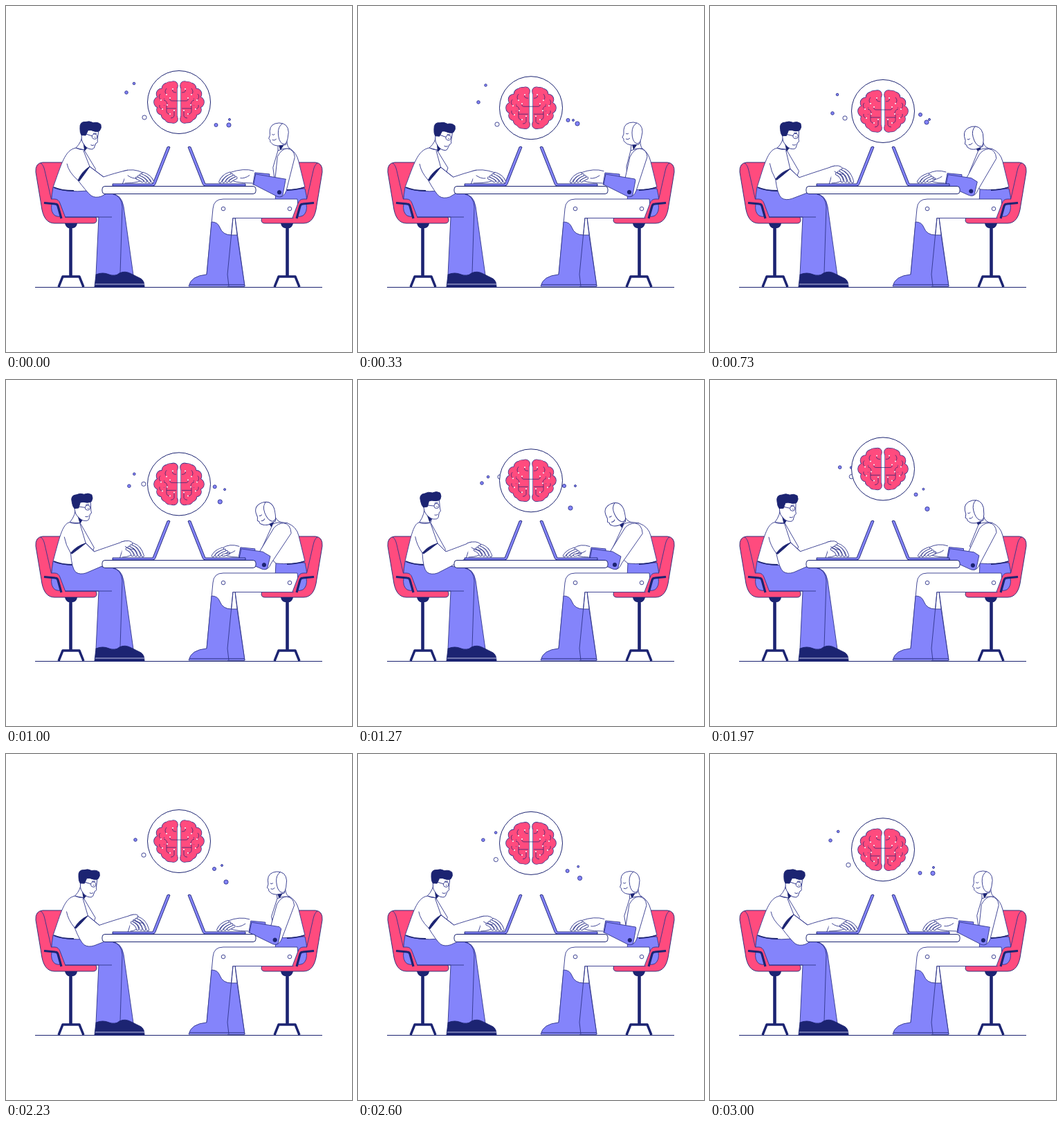
Write an HTML page with a canvas that moves like this. It is 500 px wide and 500 px high and loops after 3030 ms.

```html
<!DOCTYPE html>
<html lang="en">
<head>
<meta charset="utf-8">
<title>Brainstorm</title>
<style>
  html, body { margin: 0; width: 100%; height: 100%; overflow: hidden; background: #fff; }
  canvas { display: block; width: 500px; height: 500px; }
</style>
</head>
<body>
<canvas id="stage" width="500" height="500"></canvas>
<script>
const ctx = document.getElementById('stage').getContext('2d');
const LOOP = 3030;
const TIMES = [0, 330, 730, 1270, 1670, 2230];
const PINK = '#ff4b7e', LILAC = '#8484fb', NAVY = '#1c2472', LINE = '#30368c', WHITE = '#fff';

// Smooth periodic curve through one value per key time, without overshoot.
function track(v) {
  const n = v.length;
  const at = i => v[(i + n) % n];
  const span = i => ((TIMES[(i + 1) % n] - TIMES[(i + n) % n]) + LOOP) % LOOP;
  const rise = i => (at(i + 1) - at(i)) / span((i + n) % n);
  const slope = v.map((_, i) => {
    const a = rise(i - 1), b = rise(i);
    return a * b > 0 ? 2 * a * b / (a + b) : 0;
  });
  return t => {
    let i = n - 1;
    while (TIMES[i] > t) i--;
    const h = span(i), s = (t - TIMES[i]) / h, s2 = s * s, s3 = s2 * s;
    return (2 * s3 - 3 * s2 + 1) * at(i) + (s3 - 2 * s2 + s) * h * slope[i] +
      (3 * s2 - 2 * s3) * at(i + 1) + (s3 - s2) * h * slope[(i + 1) % n];
  };
}

const man = {
  x: track([121.5, 124.5, 116, 104.5, 102, 119.5]),
  y: track([176, 177.5, 176, 171, 171, 176]),
  tilt: track([12, 14, 7, 0, 0, 11]),
  lean: track([.13, 0, .38, .9, 1, .22]),
  arm: track([0, .24, .85, 1, 1, .44]),
  wrist: track([176, 171, 180, 164, 163, 184]),
  tip: track([213, 213, 207, 193, 194, 206]),
  lift: track([237, 237, 231, 234, 234, 232])
};
const bot = {
  lean: track([.1, 0, .6, .97, 1, .2]),
  arm: track([-.14, 0, .7, 1, 1, .16])
};

const dot = (r, fill, xs, ys) => ({ r, fill, x: track(xs), y: track(ys) });
const dots = [
  dot(1.8, LILAC, [185, 184.5, 184, 188, 194, 210], [112, 114.5, 128, 140, 138, 117]),
  dot(2.3, LILAC, [174, 174, 177, 179, 188, 187], [125, 139, 155, 149, 132, 124]),
  dot(3.1, WHITE, [200, 201, 195, 205, 211, 199], [161, 171, 162, 140, 135, 146]),
  dot(2.5, LILAC, [303.5, 303.5, 304, 298, 294, 301], [172, 165, 157, 153, 165, 166]),
  dot(3.1, LILAC, [322, 317, 313, 307, 309, 318], [172, 170, 168, 185, 187, 185]),
  dot(1.5, LILAC, [323, 311, 317, 314, 306, 312], [164, 165, 164, 153, 154, 161])
];

const mix = (a, b, u) => a + (b - a) * u;
const mixPt = (a, b, u) => [mix(a[0], b[0], u), mix(a[1], b[1], u)];
const off = (p, x, y) => [p[0] + x, p[1] + y];

function shape(d, fill, line = LINE, width = .9) {
  const p = new Path2D(d);
  if (fill) { ctx.fillStyle = fill; ctx.fill(p); }
  if (line) { ctx.strokeStyle = line; ctx.lineWidth = width; ctx.stroke(p); }
}
function disc(x, y, r, fill, line = LINE, width = .9) {
  ctx.beginPath();
  ctx.arc(x, y, r, 0, 7);
  if (fill) { ctx.fillStyle = fill; ctx.fill(); }
  if (line) { ctx.strokeStyle = line; ctx.lineWidth = width; ctx.stroke(); }
}
function mirrored(draw) {
  ctx.save();
  ctx.translate(500, 0);
  ctx.scale(-1, 1);
  draw();
  ctx.restore();
}
function placed(x, y, deg, draw) {
  ctx.save();
  ctx.translate(x, y);
  ctx.rotate(deg * Math.PI / 180);
  draw();
  ctx.restore();
}
function spin(x, y, deg, px, py) {
  const a = deg * Math.PI / 180, c = Math.cos(a), s = Math.sin(a);
  return [x + px * c - py * s, y + px * s + py * c];
}

function chair() {
  shape('M85 226L53 226Q42 227 43 240L51 288Q54 314 70 314L126 314Q131 314 131 309L130 305L80 305Z', PINK, NAVY);
  shape('M50 227Q54 229 56 238L67 286', null);
  shape('M85 314L103 314Q102 320 97 321L90 321Q86 319 85 314Z', NAVY, null);
  shape('M93.5 320V391', null, NAVY, 4.6);
  shape('M76 406L82 391H106L112 406', null, NAVY, 3.4);
}
// Pink side panel with a gap that shows the hip, and the dark rest on top.
function armrest() {
  shape('M53 279H70Q76 279 78 285L86 306H62Z', PINK, null);
  shape('M65 279H70Q76 279 78 285L86 306', null);
  shape('M66 286Q64 298 71 303Q75 305 79 304L74 287Z', LILAC);
  shape('M55 284.5L71 286Q74 286 75 289L80 307', null, NAVY, 3.2);
}

function manLegs() {
  shape('M68 262Q64 284 67 293Q71 304 85 305H134L130 389H184L170 290Q167 271 150 271L115 267Z', LILAC);
  shape('M84 305H153M155 272Q167 275 168 290L165 386', null);
  shape('M130 388Q140 384 149 388Q157 392 164 386Q172 382 181 387Q189 391 195 394Q200 397 200 406H128Z', NAVY, NAVY);
  shape('M129 402H200', null, '#d9daf8', .9);
}

function botLegs() {
  shape('M390 264H432Q437 284 433 294Q429 305 415 306H388Z', LILAC);
  shape('M326 306H331L345 405H320Z', WHITE);
  shape('M421 279H314Q300 279 299 293L290 388L320 388L328 306.5H415Q424 296 421 279Z', WHITE);
  shape('M297 312Q306 312 309 320Q313 331 326 331H334L345 405H264Q267 390 290 388Z', LILAC);
  shape('M331 306L334 331M328 306L320 388L322 405M265 402.5H345', null);
  disc(314, 293, 2.8, WHITE);
  disc(410, 293, 2.8, WHITE);
}

function manHead() {
  shape('M-10 11Q-9 20 -6 23Q1 31 7 30Q12 30 12 25L13 20Q16 19 14 15L13 3H-8Z', WHITE);
  shape('M-14 4Q-17 -6 -8 -7Q-3 -10 3 -8Q9 -11 14 -8Q17 -3 14 2Q9 5 2 3L-2 4Q-3 8 -4 12L-10 13Q-13 10 -14 4Z', NAVY, NAVY);
  disc(9, 11, 3.6, WHITE);
  shape('M-4 10L5.4 11M6 7L11 6M6 24Q9 25 11 23M9 12H10.5', null);
}

function manBody(t) {
  const u = man.lean(t), x = man.x(t), y = man.y(t), tilt = man.tilt(t);
  const local = (px, py) => spin(x, y, tilt, px, py);
  const back = mixPt([103, 205], [87, 206], u), front = mixPt([114, 208], [104, 206], u);
  const c1 = mixPt([86, 208], [79, 207], u), c2 = mixPt([81, 228], [75, 230], u);
  const chest = mixPt([130, 234], [126, 246], u);
  shape(`M${local(-9, 10)}Q${local(-7, 22)} ${back}L${front}L${local(3, 27)}Z`, WHITE);
  shape(`M68 262C${c2} ${c1} ${back}Q${off(back, 6, 3)} ${front}L${chest}L118 267Q88 270 68 262Z`, WHITE);
  shape('M69 262Q80 267 98 267', null, NAVY, 1.8);
  shape(`M${local(-6, 21)}Q${local(-1, 28)} ${local(3, 28)}L${local(-1, 35)}Z`, NAVY, null);
  placed(x, y, tilt, manHead);
}

function manArm(t) {
  const u = man.arm(t), v = man.lean(t);
  const cuffL = mixPt([104, 252], [93, 250], u), cuffR = mixPt([121, 232], [115, 236], u);
  const elbow = mixPt([129, 276], [106, 280], u), bend = mixPt([141, 247], [127, 248], u);
  const front = mixPt([113, 209], [104, 207], v), pit = mixPt([89, 228], [82, 226], v);
  const w = man.wrist(t), top = man.lift(t);
  shape(`M${cuffL}Q${off(elbow, -12, -7)} ${off(elbow, -6, -2)}Q${off(elbow, 0, 2)} ${off(elbow, 9, -1)}L${w - 8} 258L${w} ${top}Q${off(bend, 14, -5)} ${bend}L${cuffR}Z`, WHITE);
  shape(`M${front}L${cuffR}L${bend}`, null);
  shape(`M${pit}Q${off(pit, 2, 12)} ${cuffL}`, null);
  const mid = mixPt(cuffL, cuffR, .5);
  shape(`M${cuffL}Q${off(mid, -3, -3)} ${cuffR}Q${off(mid, 1, 1)} ${off(cuffL, 2, 1)}Z`, NAVY, NAVY);
}

function hand(w, top, tip, dir) {
  const knuckle = tip - 19 * dir;
  ctx.lineCap = 'round';
  shape(`M${w - 6 * dir} ${top + 1.5}Q${w + 8 * dir} ${top - 3} ${knuckle + 4 * dir} ${top + 4}L${knuckle + 6 * dir} 249Q${knuckle} 256 ${w - 4 * dir} 256`, WHITE);
  for (let i = 0; i < 4; i++) {
    const a = knuckle + (4 - 3 * i) * dir, b = tip - (1 + 5 * i) * dir, y = top + 5 + i * 2.2;
    const d = `M${a} ${y}Q${(a + b) / 2 + 3 * dir} ${y + 3} ${b} ${254 - i * .3}`;
    shape(d, null, LINE, 4.2);
    shape(d, null, WHITE, 2.6);
  }
  shape(`M${w} ${top + 8}Q${w + 7 * dir} ${top + 13} ${w + 13 * dir} ${top + 12}`, null);
  ctx.lineCap = 'butt';
}

function botHead() {
  shape('M-13 -5Q-12 -16 1 -16Q14 -15 14 -2Q13 8 9 16L-2 17Q-9 16 -11 13Q-14 11 -13 8L-15 6L-13 1Z', WHITE);
  shape('M6 -15Q-1 -11 -1 -1Q-1 10 4 14Q8 16 10 13', null);
  shape('M-10 0Q-8 2 -6 0M-10 8Q-7 10 -4 7', null);
}

function botBody(t) {
  const u = bot.lean(t), x = 397 - 26 * u, y = 184 + 10 * u, tilt = -25 * u;
  const local = (px, py) => spin(x, y, tilt, px, py);
  const front = mixPt([394, 209], [384, 208], u), back = mixPt([411, 206], [406, 207], u);
  const chest = mixPt([388, 232], [366, 246], u);
  shape(`M${local(-2, 16)}L${front}L${back}Q${local(11, 20)} ${local(11, 10)}Z`, WHITE);
  shape(`M${local(-1, 16)}L${local(8, 14)}L${local(1, 24)}Z`, NAVY, null);
  shape(`M${front}Q${off(front, 8, -4)} ${back}Q420 212 423 225L432 262Q414 267 390 265L${chest}Z`, WHITE);
  shape('M431 262Q420 266 406 266', null, NAVY, 1.8);
  placed(x, y, tilt, botHead);
}

function botArm(t) {
  const u = bot.arm(t), v = bot.lean(t);
  const s = mixPt([405, 216], [398, 217], v);
  const e = mixPt([392, 269], [371, 267], u), w = mixPt([354, 249], [334, 250], u);
  shape(`M${off(w, 3, -8)}L${off(w, 24, -6)}V258H${w[0]}Z`, LILAC);
  const l = mixPt([-12, 2], [-12, -4], v), r = mixPt([13, 2], [13, 5], v);
  shape(`M${off(e, -6, -20)}L${off(s, ...l)}Q${off(s, -6, -10)} ${off(s, 2, -10)}Q${off(s, 12, -9)} ${off(s, ...r)}L${off(e, 10, -2)}Q${off(e, 6, 8)} ${off(e, 0, 6)}Z`, WHITE);
  shape(`M${off(w, 4, -6)}L${off(e, mix(8, -3, u), -19)}L${off(e, 9, mix(-17, -12, u))}L${off(e, 5, 4)}Q${off(e, 3, 8)} ${off(e, -3, 6)}L${off(w, 1, 9)}Z`, LILAC);
  disc(e[0], e[1], 2.7, NAVY, NAVY);
}

function table() {
  ctx.beginPath();
  ctx.roundRect(139, 260.5, 222, 11, 4);
  ctx.fillStyle = WHITE;
  ctx.fill();
  ctx.strokeStyle = NAVY;
  ctx.lineWidth = 1;
  ctx.stroke();
}
function laptop() {
  shape('M154 257H212L233 204Q235 202 237 204L216 257Q215 260 212 260H154Z', LILAC, NAVY, .9);
}

const BUMPS = [[-8, -24, 6], [-17, -20, 7.5], [-25, -12, 7.5], [-28, 0, 8], [-25, 11, 7], [-18, 18, 7.5], [-8, 24, 6]];
const NODES = [[-9, -19], [-18, -11], [-13, -6], [-26, -3], [-17, 4], [-24, 10], [-13, 17], [-7, 12]];
function lobe() {
  BUMPS.forEach(([x, y, r]) => disc(x, y, r, PINK, LINE, 1.6));
  ctx.beginPath();
  ctx.roundRect(-21, -29.5, 18, 59, [8, 4, 4, 8]);
  ctx.lineWidth = 1.3;
  ctx.strokeStyle = LINE;
  ctx.stroke();
  ctx.fillStyle = PINK;
  ctx.fill();
  BUMPS.forEach(([x, y, r]) => disc(x, y, r, PINK, null));
  shape('M-9 -19Q-11 -14 -4 -14M-18 -11Q-22 -15 -18 -20M-26 -3Q-31 -8 -27 -12M0 -2H-10Q-14 -2 -13 -6M-17 4Q-17 -2 -22 -3M-18 9V4M-24 10Q-29 9 -28 4M-18 9H-4M-13 17Q-19 18 -18 9M-7 12V20Q-8 23 -12 23', null, NAVY, .7);
  NODES.forEach(([x, y]) => disc(x, y, 1, WHITE, null));
}

function brain(t) {
  const y = 139 + 13 * Math.sin(t / LOOP * 2 * Math.PI);
  disc(250, y, 45.5, WHITE, NAVY, 1);
  ctx.save();
  ctx.translate(250, y);
  lobe();
  ctx.scale(-1, 1);
  lobe();
  ctx.restore();
}

function draw(t) {
  ctx.fillStyle = WHITE;
  ctx.fillRect(0, 0, 500, 500);
  ctx.lineJoin = 'round';

  dots.forEach(d => disc(d.x(t), d.y(t), d.r, d.fill));
  brain(t);

  chair();
  mirrored(chair);
  manLegs();
  botLegs();
  shape('M42 406.5H457', null, NAVY, 1);

  manBody(t);
  botBody(t);
  armrest();
  mirrored(armrest);
  manArm(t);
  botArm(t);

  table();
  laptop();
  mirrored(laptop);
  hand(man.wrist(t), man.lift(t), man.tip(t), 1);
  const u = bot.arm(t);
  hand(mix(349, 329, u), mix(237, 239, u), mix(307, 297, u), -1);
}

const start = performance.now();
function frame() {
  draw((performance.now() - start) % LOOP);
  requestAnimationFrame(frame);
}
frame();
</script>
</body>
</html>
```
